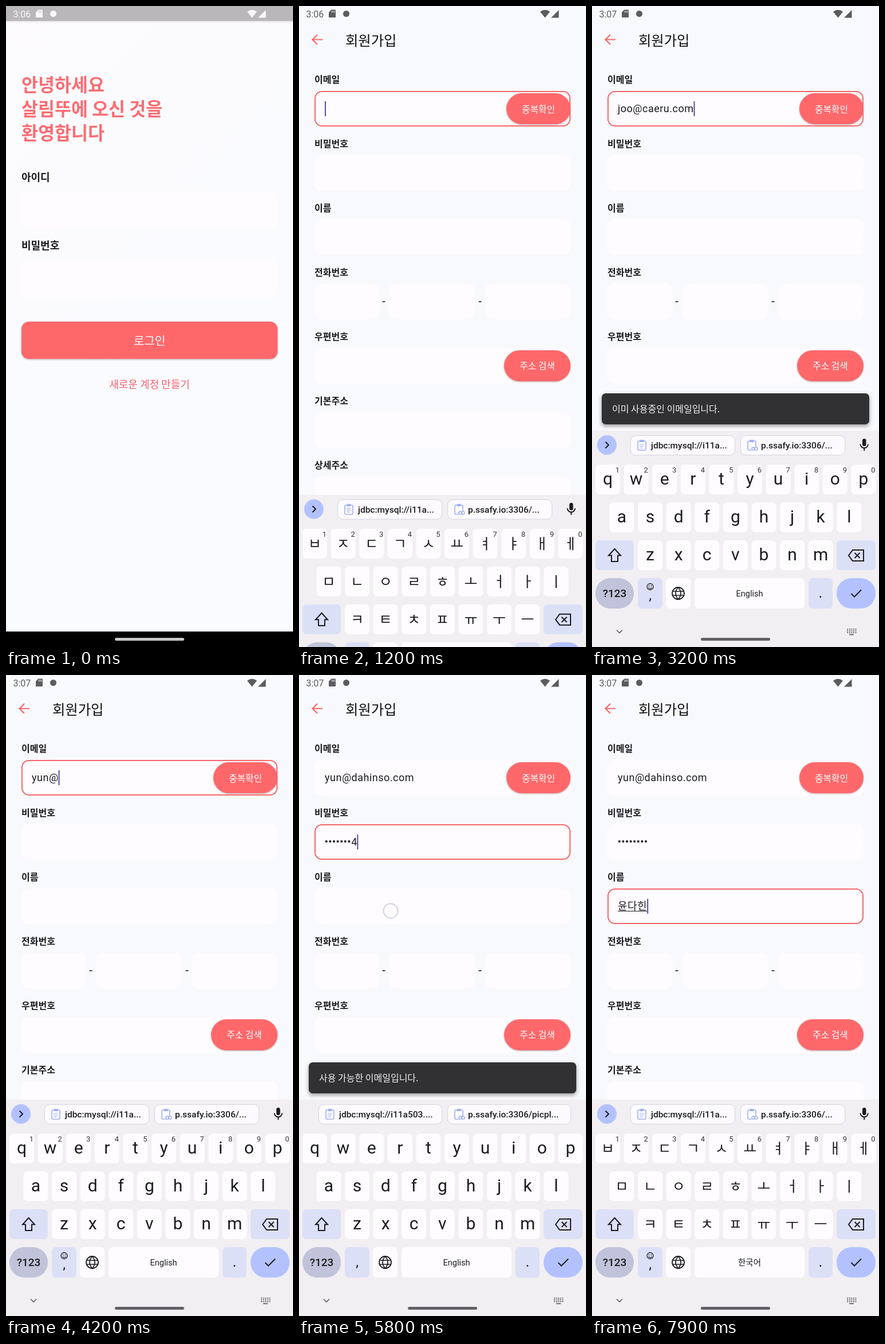
These frames come from a looping animation (501x1117 px, 8000 ms). An HTML page with a canvas:

```html
<!DOCTYPE html>
<html lang="ko">
<head>
<meta charset="utf-8">
<title>회원가입</title>
<style>
  html, body { margin: 0; width: 100%; height: 100%; overflow: hidden; background: #f8f9fc; }
  canvas { display: block; }
</style>
</head>
<body>
<canvas id="stage" width="501" height="1117"></canvas>
<script>
const ctx = document.getElementById('stage').getContext('2d');
const LOOP = 8000, STEP = 100;
const CORAL = '#fe686b', INK = '#1b1b1f', FIELD = '#fefcfe', BLUE = '#b3c2ff', PALE = '#dce0f7';
const KOREAN = '"Noto Sans CJK KR", "Noto Sans CJK", sans-serif';
const LATIN = 'Roboto, "Noto Sans CJK KR", sans-serif';

const FIRST_MAIL = 'joo@caeru.com', MAIL = 'yun@dahinso.com';
const NAME_STEPS = ['', 'ㅇ', '유', '윤', '윤ㄷ', '윤다', '윤닿', '윤다히', '윤다힌'];
const LABELS = ['이메일', '비밀번호', '이름', '전화번호', '우편번호', '기본주소', '상세주소'];
const LAYOUTS = {
  en: ['qwertyuiop', 'asdfghjkl', 'zxcvbnm'],
  ko: ['ㅂㅈㄷㄱㅅㅛㅕㅑㅐㅔ', 'ㅁㄴㅇㄹㅎㅗㅓㅏㅣ', 'ㅋㅌㅊㅍㅠㅜㅡ']
};

const ramp = (t, a, b) => Math.min(1, Math.max(0, (t - a) / (b - a)));
const ease = x => 1 - (1 - x) ** 3;
const mix = (a, b, k) => a + (b - a) * k;

function text(str, x, y, size, { color = INK, font = KOREAN, weight = 400, align = 'left', spacing = 0 } = {}) {
  ctx.font = `${weight} ${size}px ${font}`;
  ctx.textAlign = align;
  ctx.letterSpacing = spacing + 'px';
  ctx.fillStyle = color;
  ctx.fillText(str, x, y);
  return ctx.measureText(str).width;
}

function rect(x, y, w, h, r, fill, stroke, line = 1) {
  ctx.beginPath();
  ctx.roundRect(x, y, w, h, r);
  if (fill) { ctx.fillStyle = fill; ctx.fill(); }
  if (stroke) { ctx.strokeStyle = stroke; ctx.lineWidth = line; ctx.stroke(); }
}

function circle(x, y, r, fill, stroke, line) {
  rect(x - r, y - r, 2 * r, 2 * r, r, fill, stroke, line);
}

function path(d, { x = 0, y = 0, fill, stroke, line = 2 }) {
  const shape = new Path2D(d);
  ctx.save();
  ctx.translate(x, y);
  if (fill) { ctx.fillStyle = fill; ctx.fill(shape); }
  if (stroke) { ctx.strokeStyle = stroke; ctx.lineWidth = line; ctx.stroke(shape); }
  ctx.restore();
}

function shadowed(color, blur, dy, draw) {
  ctx.save();
  ctx.shadowColor = color;
  ctx.shadowBlur = blur;
  ctx.shadowOffsetY = dy;
  draw();
  ctx.restore();
}

function button(label, x, y, w, h, r, size, baseline) {
  shadowed('rgba(60,20,30,.35)', 3, 1, () => rect(x, y, w, h, r, CORAL));
  text(label, x + w / 2, baseline, size, { color: '#fff', align: 'center' });
}

function field(x, y, w, h = 62) {
  shadowed('rgba(255,250,254,.9)', 5, 0, () => rect(x, y, w, h, 13, FIELD));
}

function statusBar(t) {
  const color = t < 300 ? '#fafafa' : t < 700 ? '#b7b7ba' : '#5c5c60';
  text(t < 2000 ? '3:06' : '3:07', 12.5, 20, 16, { color, font: LATIN });
  path('M56.500 6.500H63Q64 6.500 64 7.500V19Q64 20 63 20H53Q52 20 52 19V11Z', { fill: color });
  path('M57.500 8.500v3M59.800 8.500v3M62 8.500v3', { stroke: t < 300 ? '#b9b7b9' : '#f8f9fc', line: 1 });
  circle(82.500, 13.500, 5.500, color);
  path('M429.500 20.500L421 10Q429.500 3.500 438 10Z', { fill: color });
  path('M453.500 7V20.500H440Z', { fill: color });
}

function navBar(pill) {
  rect(0, 1090, 501, 27, 0, '#000');
  rect(190, 1101, 121, 5, 2.5, pill);
}

function login() {
  const back = ctx.createLinearGradient(0, 0, 501, 500);
  back.addColorStop(0, '#fdfbfe');
  back.addColorStop(1, '#f9fbfe');
  rect(0, 0, 501, 1117, 0, back);
  shadowed('rgba(0,0,0,.15)', 3, 1, () => rect(0, 0, 501, 26, 0, '#b9b7b9'));
  ['안녕하세요', '살림뚜에 오신 것을', '환영합니다'].forEach((line, i) =>
    text(line, 27, 149 + 42 * i, 31.5, { color: '#fb6d72', weight: 600 }));
  text('아이디', 27, 305, 18, { weight: 600 });
  field(27, 324, 447, 64);
  text('비밀번호', 27, 424, 18, { weight: 600 });
  field(27, 443, 447, 64);
  button('로그인', 27, 550, 447, 65, 13, 20.2, 591);
  text('새로운 계정 만들기', 250.5, 666, 18, { color: '#f4636d', align: 'center' });
}

function mailAt(t) {
  if (t < 3700) return FIRST_MAIL.slice(0, ramp(t, 1900, 2200) * 8 + ramp(t, 2200, 2500) * 5);
  if (t < 3900) return FIRST_MAIL.slice(0, 13 - ramp(t, 3700, 3900) * 13);
  return MAIL.slice(0, ramp(t, 3900, 4200) * 4 + ramp(t, 4200, 4800) * 11);
}

function focusAt(t) {
  if (t < 1100 || (t >= 6500 && t < 6900)) return -1;
  return t < 5200 ? 0 : t < 5900 ? 1 : 2;
}

function passwordEnd(t) {
  const count = Math.floor(ramp(t, 5200, 5800) * 8);
  const shown = count && t < 5900 ? 1 : 0;
  const dots = count - shown;
  for (let i = 0; i < dots; i++) circle(47.8 + 6.6 * i, 290, 2.1, INK);
  const x = 45 + 6.6 * dots;
  return x + (shown ? text(String((count - 1) % 4 + 1), x, 297, 18, { font: LATIN }) : 0);
}

function form(t) {
  rect(0, 0, 501, 1117, 0, '#f8f9fc');
  path('M41 58.500H24M32 50L23.500 58.500L32 67', { stroke: '#fb666b', line: 2.2 });
  text('회원가입', 81, 69, 24.3, { color: '#111' });
  LABELS.forEach((label, i) => {
    const y = 148 + 112 * i;
    text(label, 27, y - 14, 16, { weight: 600 });
    if (i === 3) [[27, 113], [157, 150], [325, 149]].forEach(([x, w]) => field(x, y, w));
    else field(27, y, 447);
  });
  rect(145.5, 514.5, 5, 1.6, 0, INK);
  rect(313.5, 514.5, 5, 1.6, 0, INK);
  button('중복확인', 362, 152, 112, 54, 27, 15.8, 186);
  button('주소 검색', 358, 600, 116, 54, 27, 15.8, 633);
  button('회원가입 완료', 27, 919, 447, 65, 13, 20.2, 959);

  const name = NAME_STEPS[Math.floor(ramp(t, 7200, 7900) * 8)];
  const ends = [
    45 + text(mailAt(t), 45, 185, 18, { font: LATIN, spacing: .5 }),
    passwordEnd(t),
    45 + text(name, 45, 409, 18, { spacing: .5 })
  ];
  if (name) rect(45, 411, ends[2] - 45, 1, 0, INK);
  const focus = focusAt(t);
  if (focus >= 0) {
    const y = 148 + 112 * focus;
    rect(28, y + 1, 445, 60, 12, null, '#f4686c', 2);
    rect(ends[focus], y + 18, 2, 26, 0, '#5350a0');
  }
}

function chip(x, w, label, linked) {
  rect(x + .5, 748.5, w - 1, 34, 9, '#fdfbff', '#d5d4df');
  const left = x + 12;
  rect(left + 1, 758, 14, 16, 2, null, '#9fb0f3', 1.6);
  rect(left + 4.5, 756, 7, 4, 1, '#9fb0f3');
  if (linked) {
    rect(left + 7, 768, 11, 8, 4, '#fdfbff');
    rect(left + 8, 769, 5, 5, 2.5, null, '#9fb0f3', 1.5);
    rect(left + 13, 769, 5, 5, 2.5, null, '#9fb0f3', 1.5);
  } else {
    path('M4.500 764h7M4.500 767h7M4.500 770h5', { x: left, stroke: '#9fb0f3', line: 1.2 });
  }
  text(label, x + 36, 771, 15.5, { font: LATIN, weight: 500 });
}

function toolbar(secret) {
  if (secret) {
    chip(34, 216, 'jdbc:mysql://i11a503....');
    chip(259, 216, 'p.ssafy.io:3306/picpl...', true);
    return;
  }
  circle(26, 765, 17, BLUE);
  path('M23.500 759.500L29 765L23.500 770.500', { stroke: INK });
  chip(67, 183, 'jdbc:mysql://i11a...');
  chip(259, 183, 'p.ssafy.io:3306/...', true);
  rect(472, 754, 6.5, 13, 3.2, INK);
  path('M468.500 763.500a6.700 6.700 0 0 0 13.400 0M475.200 770v5', { stroke: INK });
}

function keyboard(t) {
  const secret = focusAt(t) === 1;
  const korean = t < 1900 || t >= 6100;
  const centered = { align: 'center', font: LATIN };
  rect(0, 740, 501, 380, 0, '#f1eff2');
  toolbar(secret);

  LAYOUTS[korean ? 'ko' : 'en'].forEach((row, r) => [...row].forEach((letter, i) => {
    const x = [6, 30.5, 80][r] + 49.6 * i, y = 799 + 66 * r;
    rect(x, y, 43, 52, 7, FIELD);
    if (korean) text(letter, x + 21.5, y + 35, 25, { align: 'center' });
    else text(letter, x + 21.5, y + 34.5, 30, centered);
    if (!r && !secret) text((i + 1) % 10, x + 38.5, y + 14, 13, { ...centered, color: '#333' });
  }));

  rect(6, 931, 67, 52, 7, PALE);
  path('M39.500 946L50 957.500H45V968H34V957.500H29Z', { stroke: INK });
  rect(427, 931, 68, 52, 7, PALE);
  path('M455 948H474V967H455L448 957.500ZM458.500 953l9 9M467.500 953l-9 9', { stroke: INK });

  rect(6, 997, 67, 53, 26, '#c0c3da');
  text('?123', 39.5, 1030, 19, { ...centered, weight: 500 });
  rect(80, 997, 43, 53, 7, PALE);
  text(',', 101.5, secret ? 1031 : 1035, 24, centered);
  if (!secret) {
    circle(101.5, 1012, 5.5, null, INK, 1.3);
    circle(99.5, 1010.5, .9, INK);
    circle(103.5, 1010.5, .9, INK);
    path('M98.500 1013.500q3 3.500 6 0', { stroke: INK, line: 1.2 });
  }
  rect(129, 997, 43, 53, 7, FIELD);
  circle(150.5, 1023.5, 10.5, null, INK, 1.8);
  path('M140 1020h21M140 1027h21M150.500 1013q-9 10.500 0 21q9 -10.500 0 -21', { stroke: INK, line: 1.6 });
  rect(179, 997, 192, 53, 7, FIELD);
  text(korean ? '한국어' : 'English', 275, 1029, 14.5, centered);
  rect(378, 997, 42, 53, 7, PALE);
  text('.', 399, 1031, 26, centered);
  rect(427, 997, 68, 53, 26, BLUE);
  path('M452.500 1024L458 1029.500L470 1017.500', { stroke: INK });

  path('M43 1087.500L48 1092.500L53 1087.500', { stroke: '#5f5f64', line: 1.6 });
  for (let i = 0; i < 15; i++) rect(445 + i % 5 * 3.6, 1085 + Math.floor(i / 5) * 3, 2, 1.8, 0, '#5f5f64');
  rect(449, 1094.5, 8, 1.8, 0, '#5f5f64');
  rect(190, 1101, 121, 5, 2.5, '#626166');
}

function snackbar(message, alpha) {
  if (!alpha) return;
  ctx.save();
  ctx.globalAlpha = alpha;
  shadowed('rgba(0,0,0,.4)', 7, 3, () => rect(17, 675, 467, 54, 7, '#313033'));
  text(message, 35, 708, 16, { color: '#f1eff3' });
  ctx.restore();
}

function pointer(t) {
  if (t < 5600 || t >= 7300) return;
  const enter = ramp(t, 5600, 5800), move = ramp(t, 6100, 6600);
  const x = mix(mix(185, 160, enter), 167, move), y = mix(mix(340, 411, enter), 386, move);
  circle(x, y, 12.5, null, '#d3d1e6', 2);
}

function draw(t) {
  const arrive = ease(ramp(t, 100, 500));
  ctx.clearRect(0, 0, 501, 1117);
  if (arrive < 1) login();
  if (arrive > 0) {
    const scale = mix(.85, 1, arrive);
    ctx.save();
    ctx.globalAlpha = arrive;
    ctx.translate(250.5, 558.5);
    ctx.scale(scale, scale);
    ctx.translate(-250.5, -558.5);
    form(t);
    ctx.restore();
  }
  statusBar(t);
  navBar(t < 300 ? '#c8c8c8' : '#f4f4f4');

  snackbar('이미 사용중인 이메일입니다.', ramp(t, 2800, 3000) * (1 - ramp(t, 3400, 3600)));
  snackbar('사용 가능한 이메일입니다.', ramp(t, 4900, 5100) * (1 - ramp(t, 6100, 6300)));

  const raised = t < 6400 ? ease(ramp(t, 1100, 1400))
    : t < 6900 ? 1 - ease(ramp(t, 6400, 6600)) : ease(ramp(t, 6900, 7200));
  if (raised > 0) {
    ctx.save();
    ctx.translate(0, 377 * (1 - raised));
    keyboard(t);
    ctx.restore();
  }
  pointer(t);
}

const start = performance.now();
function tick() {
  const t = (performance.now() - start) % LOOP;
  draw(Math.floor(t / STEP) * STEP);
  requestAnimationFrame(tick);
}
tick();
</script>
</body>
</html>
```
